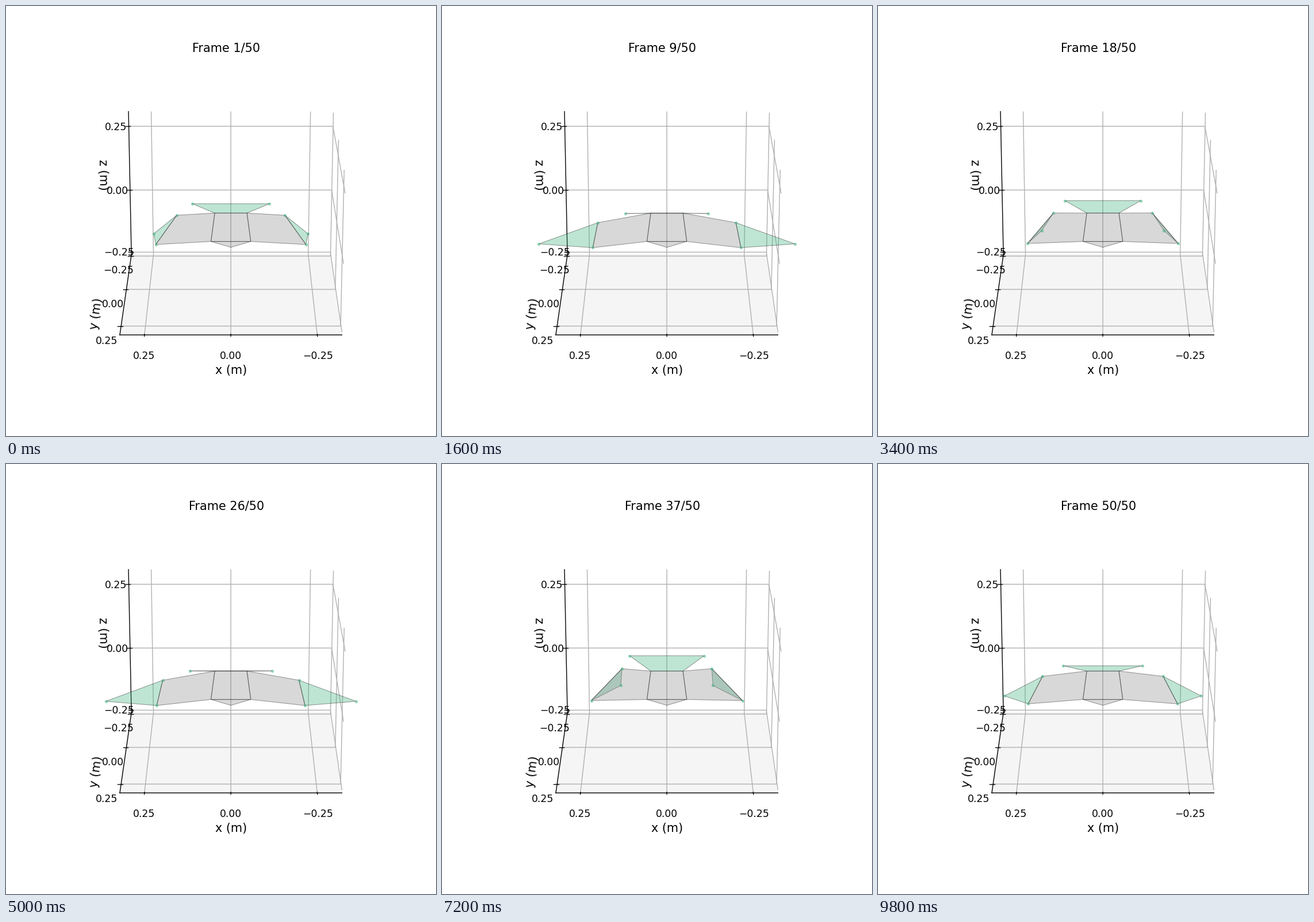
A matplotlib script for the animation above (10000 ms loop, 748 px wide and 748 px high).

```python
import numpy as np
import matplotlib.pyplot as plt
from matplotlib.animation import FuncAnimation
from matplotlib.colors import to_rgba
from matplotlib.patches import Polygon

SIZE, INCHES = 748, 6
FRAMES, STEP_MS = 50, 200
REST_FROM = 42           # the wings stay at rest from this frame on
MID = 391.15             # mirror axis of the model, in pixels
GREEN = (60 / 255, 179 / 255, 125 / 255)

plt.rcParams["font.family"] = "DejaVu Sans"
fig = plt.figure(figsize=(INCHES, INCHES), dpi=SIZE / INCHES + 1e-6, facecolor="white")

# Empty 3D box, seen from the +y side
box = fig.add_subplot(projection="3d")
box.view_init(elev=20, azim=89.999)
box.set(xlim=(-0.3213, 0.3213), ylim=(-0.2605, 0.307), zlim=(-0.2605, 0.307))
for name, axis in zip("xyz", (box.xaxis, box.yaxis, box.zaxis)):
    axis.set_ticks([-0.25, 0, 0.25])
    axis.set_label_text(f"{name} (m)", fontsize=12)
for axis in (box.xaxis, box.yaxis):
    axis.set_pane_color((1, 1, 1, 1))
title = box.set_title("")

# Flat layer in pixels for the model
ax = fig.add_axes([0, 0, 1, 1])
ax.set(xlim=(0, SIZE), ylim=(SIZE, 0))
ax.axis("off")

# Left half: fixed body corners, then wing tip, hinge top, hinge bottom, tail corner
BACK, FRONT, NOSE = (MID - 28, 360.2), (MID - 34.6, 409.6), (MID, 419.8)
NEUTRAL = np.array([(220, 403.5), (286.2, 369.4), (261.3, 417.2), (322, 351)])
SWING = np.array([(104, -20.8), (30.6, -15.2), (-2, -6.5), (5.1, -19.9)])


def stroke(i):
    """Wing lift from -1 (down) to 1 (up); the beat quickens on the last upstroke."""
    if i >= REST_FROM:
        return 0
    return np.cos(np.interp(i, [0, 6, 30, 36, 41], [-1.207, 1.358, 10.147, 13.071, 14.929]))


def mirror(pts):
    return [(2 * MID - x, y) for x, y in pts]


def panel(color, alpha, z):
    patch = Polygon([(0, 0)] * 3, closed=True, fc=to_rgba(color, alpha),
                    ec=(0, 0, 0, 0.38), lw=0.6, joinstyle="round", zorder=z)
    return ax.add_patch(patch)


tail, tip_l, tip_r = (panel(GREEN, 0.33, 1) for _ in range(3))
wing_l, wing_r, body, nose = (panel("gray", 0.3, 2) for _ in range(4))
body.set_xy([BACK, *mirror([BACK, FRONT]), FRONT])
nose.set_xy([FRONT, *mirror([FRONT]), NOSE])
dots, = ax.plot([], [], "o", ms=3, color=GREEN, alpha=0.55, mew=0, zorder=3)


def update(i):
    tip, top, low, end = left = NEUTRAL + stroke(i) * SWING
    tri, quad = [tip, top, low], [BACK, top, low, FRONT]
    tail.set_xy([end, *mirror([end, BACK]), BACK])
    for shape, pts in ((tip_l, tri), (tip_r, mirror(tri)),
                       (wing_l, quad), (wing_r, mirror(quad))):
        shape.set_xy(pts)
    dots.set_data(*zip(*left, *mirror(left)))
    title.set_text(f"Frame {i + 1}/{FRAMES}")
    return tail, tip_l, tip_r, wing_l, wing_r, dots, title


anim = FuncAnimation(fig, update, frames=FRAMES, interval=STEP_MS,
                     init_func=lambda: update(0), repeat=True, repeat_delay=0)
plt.show()
```
